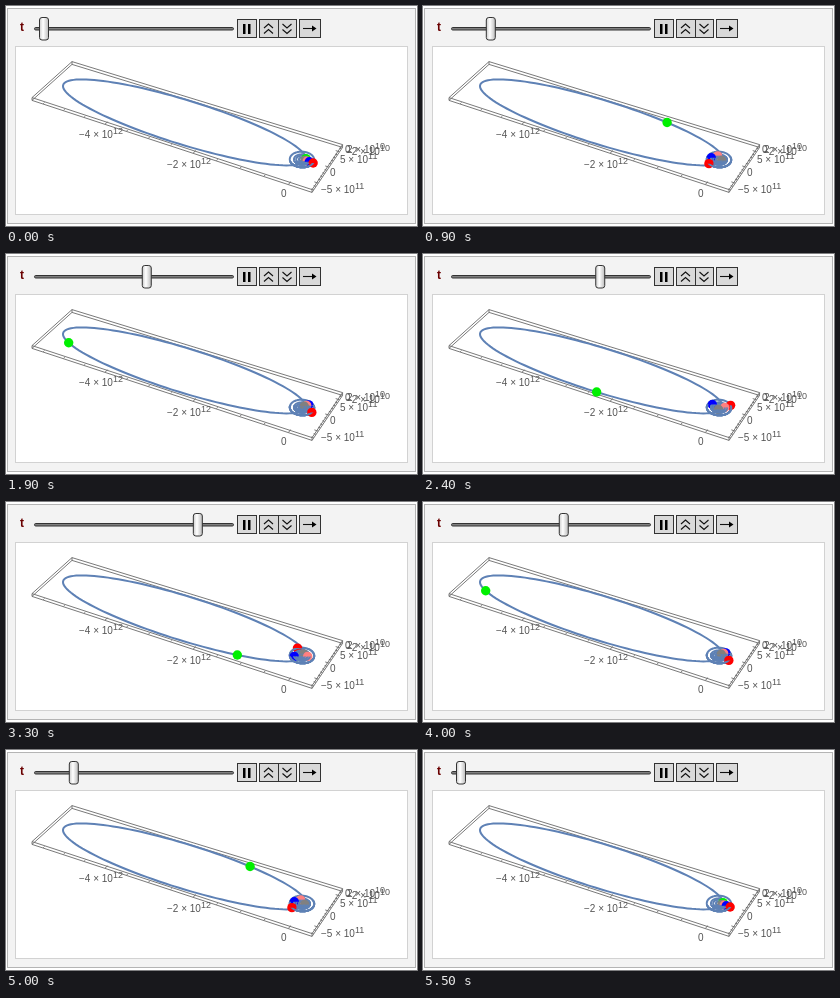
Recreate the animation shown at these times as an HTML page. Size 411x220 px, loop 6 s.

```html
<!DOCTYPE html>
<html lang="en">
<head>
<meta charset="utf-8">
<title>Comet and planets</title>
<style>
  html, body { margin: 0; width: 100%; height: 100%; overflow: hidden; background: #fff; }
  svg { display: block; }
  text { font-family: "Liberation Sans", Arial, sans-serif; font-size: 10px; fill: #555; }
  .label { font-size: 12px; font-weight: bold; fill: #6a0000; }
  .button { fill: #d9d9d9; stroke: #333; }
  .icon { fill: none; stroke: #111; stroke-width: 1.1; }
  .box { fill: none; stroke: #6a6a6a; stroke-width: .9; }
  .orbit { fill: none; stroke: #5e81b5; stroke-width: 2; }
</style>
</head>
<body>
<svg width="411" height="220" viewBox="0 0 411 220">
  <defs>
    <linearGradient id="metal">
      <stop offset="0" stop-color="#ccc"/>
      <stop offset=".4" stop-color="#fff"/>
      <stop offset="1" stop-color="#bbb"/>
    </linearGradient>
  </defs>
  <rect x="1.5" y="2.5" width="408" height="215" fill="#f3f3f3" stroke="#b4b4b4"/>
  <rect x="9.5" y="40.5" width="392" height="168" fill="#fff" stroke="#d2d2d2"/>

  <text class="label" x="14" y="25">t</text>
  <rect x="28.5" y="21.5" width="199" height="2.5" rx="1.2" fill="#808080" stroke="#333"/>
  <rect id="thumb" x="-4.5" y="11.5" width="9" height="22.5" rx="2.5" fill="url(#metal)" stroke="#333"/>

  <rect class="button" x="231.5" y="13.5" width="19" height="18"/>
  <rect class="button" x="253.5" y="13.5" width="37" height="18"/>
  <rect class="button" x="293.5" y="13.5" width="21" height="18"/>
  <path d="M272.5 13.5v18" stroke="#333"/>
  <path d="M237 18h2.5v10H237zM242 18h2.5v10H242z"/>
  <path class="icon" d="M258 22l4.5-4 4.5 4M258 27.5l4.5-4 4.5 4M276.5 18l4.5 4 4.5-4M276.5 23.5l4.5 4 4.5-4"/>
  <path class="icon" d="M297 22.5h10"/>
  <path d="M306 19.5l4.5 3-4.5 3z"/>

  <g id="scene"></g>
</svg>
<script>
const NS = 'http://www.w3.org/2000/svg';
const scene = document.getElementById('scene');
const thumb = document.getElementById('thumb');
const TAU = 2 * Math.PI;

function add(tag, attrs, parent = scene) {
  const el = document.createElementNS(NS, tag);
  for (const name in attrs) el.setAttribute(name, attrs[name]);
  return parent.appendChild(el);
}

// Perspective of the floor of the plot box, u along it and v across it.
function floor(u, v) {
  const w = 1 - .1119 * u + .0477 * v;
  return [(245.8 * u + 43.15 * v + 26) / w, (71.3 * u - 33.28 * v + 93) / w];
}

function cometAt(a) {
  return [178.5 + 121.5 * Math.cos(a), 116.4 + 43 * Math.cos(a - .567)];
}

// Circular orbit of radius r (in AU) around the sun.
function planetAt(r, a) {
  const c = r * Math.cos(a), s = r * Math.sin(a);
  return [296 + 7.3 * c + 3.3 * s, 153.5 + 2.3 * c - 4.6 * s];
}

function outline(cls, points, parent) {
  const d = 'M' + points.map(p => p.map(n => n.toFixed(2)).join(' ')).join('L') + 'Z';
  add('path', { class: cls, d }, parent);
}

function orbit(at, parent) {
  outline('orbit', Array.from({ length: 120 }, (_, i) => at(i / 120 * TAU)), parent);
}

function tick(u, v, du, dv) {
  const [x, y] = floor(u, v), [x2, y2] = floor(u + du, v + dv);
  add('path', { class: 'box', d: `M${x} ${y + 1}L${x2} ${y2 + 1}` });
}

function label(x, y, text, power) {
  const el = add('text', { x, y });
  el.textContent = text;
  if (power) add('tspan', { dy: -4, 'font-size': 9 }, el).textContent = power;
}

// Plot box
const corners = [[0, 0], [1, 0], [1, 1], [0, 1]].map(c => floor(...c));
for (const lift of [-1.4, 1.4]) outline('box', corners.map(([x, y]) => [x, y + lift]));
for (const [x, y] of corners) add('path', { class: 'box', d: `M${x} ${y - 1.4}v2.8` });
for (let i = 0; i < 12; i++) tick(.925 - .08 * i, 0, 0, i % 4 ? .03 : .06);
for (let i = 0; i < 14; i++) tick(1, .05 + .07 * i, i % 5 === 2 ? -.012 : -.007, 0);

label(73, 132, '−4 × 10', '12');
label(161, 162, '−2 × 10', '12');
label(275, 191, '0');
label(315, 187, '−5 × 10', '11');
label(324, 170, '0');
label(334, 157, '5 × 10', '11');
label(340, 149, '−2 × 10', '10');
label(339, 147, '0');
label(341, 147, '2 × 10', '10');

// Rates are turns per step
const planets = [
  { r: .387, rate: 12.72, color: '#808080' },
  { r: .723, rate: 4.981, color: '#ff8080' },
  { r: 1, rate: 3.0636, color: '#0000ff' },
  { r: 1.524, rate: 1.6303, color: '#ff0000' }
];
orbit(cometAt);
const rings = add('g', { id: 'rings' });
for (const p of planets) orbit(a => planetAt(p.r, a), rings);

// Each planet is followed by the part of the rings that lies nearer than it.
const ball = (fill, parent) => add('circle', { r: 4.7, fill }, parent);
const comet = ball('#00f000');
planets.forEach((p, i) => {
  p.layer = add('g', {});
  const clip = add('clipPath', { id: 'near' + i }, p.layer);
  p.near = add('rect', { x: 270, width: 60, height: 60 }, clip);
  p.ball = ball(p.color, p.layer);
  add('use', { href: '#rings', 'clip-path': `url(#near${i})` }, p.layer);
});

function place(el, [x, y]) {
  el.setAttribute('transform', `translate(${x.toFixed(2)} ${y.toFixed(2)})`);
}

function draw(ms) {
  // 25 steps out, 25 back, with a rest at the start and the end
  const n = Math.min(51, Math.max(0, Math.floor(ms / 100) - 4));
  const step = Math.max(0, Math.min(n, 51 - n) - .913);
  const t = .2448 * step;
  place(thumb, [38 + 29.8 * t, 0]);
  place(comet, cometAt(-t));
  for (const p of planets) {
    p.at = planetAt(p.r, p.rate * step * TAU);
    place(p.ball, p.at);
    p.near.setAttribute('y', p.at[1].toFixed(2));
  }
  const byDepth = [...planets].sort((a, b) => a.at[1] - b.at[1]);
  scene.append(...byDepth.map(p => p.layer));
}

const start = performance.now();
function loop(now) {
  draw(Math.max(0, now - start) % 6000);
  requestAnimationFrame(loop);
}
draw(0);
requestAnimationFrame(loop);
</script>
</body>
</html>
```
